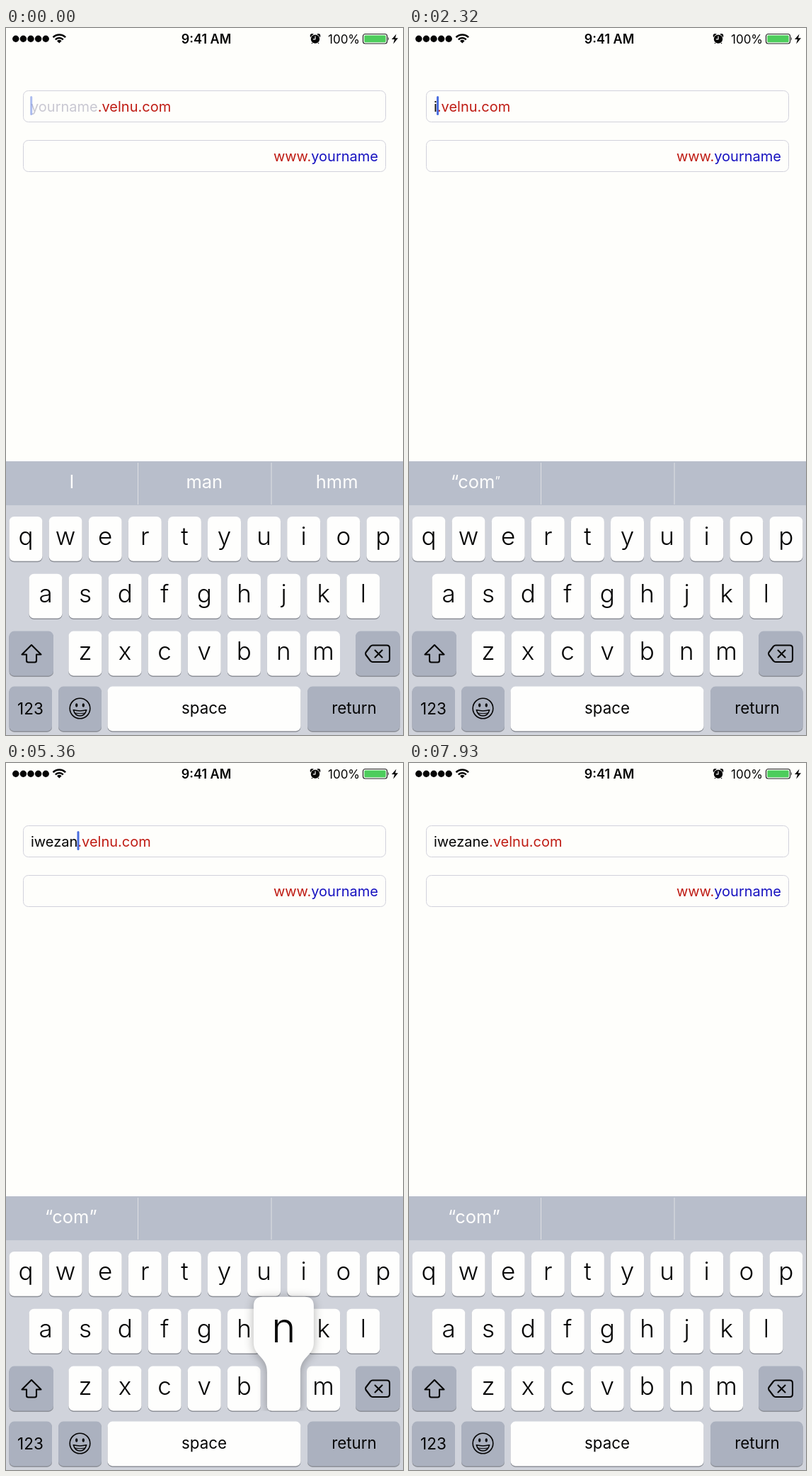
Animation of 561 by 997 pixels, one loop 8 s. Source, as an HTML page with a canvas:

```html
<!DOCTYPE html>
<html lang="en">
<head>
<meta charset="utf-8">
<title>Text fields with keyboard</title>
<style>
  html, body { margin: 0; width: 100%; height: 100%; overflow: hidden; background: #fefefb; }
  canvas { display: block; width: 561px; height: 997px; }
</style>
</head>
<body>
<canvas id="stage"></canvas>
<script>
const W = 561, H = 997, LOOP = 8000;
const canvas = document.getElementById('stage');
const ctx = canvas.getContext('2d');
const scale = window.devicePixelRatio || 1;
canvas.width = W * scale;
canvas.height = H * scale;

const INK = '#050505', RED = '#bf1c14', BLUE = '#1712c0', PALE = '#c9c8d2';
const BACK = '#fefefb', WHITE = '#fefefd';
const KEY_W = 47, KEY_H = 62.8, PITCH = 56.1;
const ROWS = [689, 769.8, 850.6, 928.6];
const DOMAIN = '.velnu.com';

const keys = {};
[['qwertyuiop', 4.5], ['asdfghjkl', 32.5], ['zxcvbnm', 88.4]].forEach(([letters, x], row) =>
  [...letters].forEach((letter, i) => keys[letter] = { x: x + i * PITCH, y: ROWS[row] }));

// letter, key down, key up (the letter is inserted on key up)
const presses = [
  ['i', 1460, 1860], ['w', 4240, 4320], ['e', 4480, 4560], ['z', 4740, 4820],
  ['a', 4990, 5070], ['n', 5230, 5310], ['e', 6030, 6120]
];
const POPUP_LINGER = 90;

const clamp = v => Math.max(0, Math.min(1, v));
const ramp = (t, from, to) => clamp((t - from) / (to - from));

function text(str, x, y, size, color, align = 'left', weight = 400) {
  ctx.font = `${weight} ${size}px Inter, sans-serif`;
  ctx.textAlign = align;
  ctx.fillStyle = color;
  ctx.fillText(str, x, y);
  return ctx.measureText(str).width;
}

function box(x, y, w, h, r, color) {
  ctx.beginPath();
  ctx.roundRect(x, y, w, h, r);
  ctx.fillStyle = color;
  ctx.fill();
}

function disc(x, y, r, color = INK) {
  ctx.beginPath();
  ctx.arc(x, y, r, 0, 7);
  ctx.fillStyle = color;
  ctx.fill();
}

function stroke(path, width, color = INK) {
  ctx.lineWidth = width;
  ctx.strokeStyle = color;
  ctx.stroke(new Path2D(path));
}

function fill(path, color = INK) {
  ctx.fillStyle = color;
  ctx.fill(new Path2D(path));
}

function statusBar() {
  for (let i = 0; i < 5; i++) disc(13.8 + i * 10.6, 15.3, 4.7);
  ctx.lineCap = 'butt';
  stroke('M66.5 13.2A12.2 12.2 0 0 1 84.1 13.2M69.8 16.3A7.8 7.8 0 0 1 80.8 16.3', 2.5);
  fill('M75.3 21.5L72 18.2A4.7 4.7 0 0 1 78.6 18.2Z');
  text('9:41 AM', 283, 21.6, 18, INK, 'center', 600);

  // Alarm clock: bells, feet, a gap ring, then the dial with its hands.
  disc(432.6, 11, 2.9);
  disc(441.4, 11, 2.9);
  stroke('M433.6 19.5L432.2 22M440.4 19.5L441.8 22', 1.5);
  disc(437, 15.6, 7, BACK);
  disc(437, 15.6, 6.2);
  stroke('M437 11.6V15.8H433.8', 1.2, WHITE);

  text('100%', 455, 21.6, 17, INK);
  ctx.beginPath();
  ctx.roundRect(504.5, 8.5, 34, 13.5, 3);
  ctx.lineWidth = 1.2;
  ctx.strokeStyle = '#222';
  ctx.stroke();
  box(506.3, 10.2, 30.4, 10, 1.5, '#4dcd5c');
  fill('M539.8 12.5Q542 15.2 539.8 18Z', '#222');
  fill('M551.5 8.5L545 16H549L547.2 22.5L554 14.2H550Z');
}

function fieldBorder(y) {
  ctx.beginPath();
  ctx.roundRect(24.5, y + .5, 512, 44, 7);
  ctx.lineWidth = 1;
  ctx.strokeStyle = '#d2d2dc';
  ctx.stroke();
}

function caretOpacity(t, lastInsert) {
  const phase = (t - lastInsert) % 1000;
  return 1 - ramp(phase, 600, 750) + ramp(phase, 920, 1000);
}

function fields(t) {
  fieldBorder(88);
  fieldBorder(158);
  const done = presses.filter(p => t >= p[2]);
  const typed = done.map(p => p[0]).join('');
  const start = 35, baseline = 117.7, size = 20;
  const width = text(typed || 'yourname', start, baseline, size, typed ? INK : PALE);
  text(DOMAIN, start + width, baseline, size, RED);

  const lastInsert = done.length ? done[done.length - 1][2] : -955;
  ctx.globalAlpha = caretOpacity(t, lastInsert);
  box(start - .8 + (typed ? width : 0), 96, 3, 27, 1.5, '#4a6ddf');
  ctx.globalAlpha = 1;

  const nameWidth = text('yourname', 526, 187.8, size, BLUE, 'right');
  text('www.', 526 - nameWidth, 187.8, size, RED, 'right');
}

function suggestions(t) {
  box(0, 611, W, 62, 0, '#b8becb');
  box(186, 613, 1, 59, 0, '#dedfe4');
  box(374.5, 613, 1, 59, 0, '#dedfe4');
  const y = 649, size = 25.5;
  const grow = ramp(t, 2240, 2400);
  if (!grow) {
    ['I', 'man', 'hmm'].forEach((word, i) => text(word, 93 + i * 187.3, y, size, WHITE, 'center'));
    return;
  }
  const left = 55 + 8 * (1 - grow);
  const end = left + text('“com', left, y, size, WHITE);
  const quoteSize = size * (.3 + .7 * grow);
  text('”', end, y - .5 * (size - quoteSize), quoteSize, WHITE);
}

function key(x, y, w, color = WHITE) {
  box(x, y + 1.5, w, KEY_H, 7, '#8d9098');
  box(x, y, w, KEY_H, 7, color);
}

function keyboard() {
  const DARK = '#abb1bf';
  const [, , third, fourth] = ROWS;
  box(0, 673, W, H - 673, 0, '#d0d3db');
  for (const [letter, { x, y }] of Object.entries(keys)) {
    key(x, y, KEY_W);
    text(letter, x + KEY_W / 2, y + 40, 35, INK, 'center', 350);
  }
  key(4.5, third, 62.5, DARK);
  key(494, third, 62.5, DARK);
  key(4.5, fourth, 60.5, DARK);
  key(74, fourth, 61, DARK);
  key(143.5, fourth, 273, WHITE);
  key(426, fourth, 130.5, DARK);
  text('123', 34.5, 968, 22.5, INK, 'center');
  text('space', 280, 967, 22.3, INK, 'center');
  text('return', 492, 967, 22.3, INK, 'center');

  ctx.lineJoin = 'round';
  ctx.lineCap = 'round';
  stroke('M36 870L22.5 883.5H29V892Q29 894.5 31.5 894.5H40.5Q43 894.5 43 892V883.5H49.5Z', 2.1);
  stroke('M518 870.5H538Q542 870.5 542 874.5V890Q542 894 538 894H518Q516.5 894 515 892.5L508.5 884Q507.5 882.3 508.5 880.5L515 872Q516.5 870.5 518 870.5Z', 2.1);
  stroke('M521.5 877.5L531.5 887.5M531.5 877.5L521.5 887.5', 2.1);

  stroke('M90.2 959.5A14.3 14.3 0 1 0 118.8 959.5A14.3 14.3 0 1 0 90.2 959.5', 1.6);
  fill('M98 955a1.7 2.8 0 1 0 3.4 0a1.7 2.8 0 1 0 -3.4 0M107.6 955a1.7 2.8 0 1 0 3.4 0a1.7 2.8 0 1 0 -3.4 0');
  stroke('M95.3 961.8Q104.5 964 113.7 961.8Q111.5 970 104.5 970Q97.5 970 95.3 961.8Z', 1.5);
  stroke('M97.5 966Q104.5 967.5 111.5 966', 1.2);
}

function popup(letter) {
  const { x, y } = keys[letter];
  const bubble = new Path2D(`M${x - 6} ${y - 97.8}h59q13 0 13 13v52c0 18 -19 20 -19 40v49q0 7 -7 7
    h-33q-7 0 -7 -7v-49c0 -20 -19 -22 -19 -40v-52q0 -13 13 -13z`);
  // The key underneath is covered along with its letter and keeps its own shadow.
  key(x, y, KEY_W);
  ctx.save();
  ctx.beginPath();
  ctx.rect(0, 0, W, y + KEY_H);
  ctx.clip();
  ctx.shadowColor = 'rgba(0,0,0,.3)';
  ctx.shadowBlur = 14 * scale;
  ctx.shadowOffsetY = 2 * scale;
  ctx.fillStyle = WHITE;
  ctx.fill(bubble);
  ctx.restore();
  text(letter, x + KEY_W / 2, y - 34, 58, INK, 'center', 300);
}

function draw(t) {
  ctx.setTransform(scale, 0, 0, scale, 0, 0);
  box(0, 0, W, H, 0, BACK);
  statusBar();
  fields(t);
  suggestions(t);
  keyboard();
  presses.filter(([, down, up]) => t >= down && t < up + POPUP_LINGER)
    .forEach(([letter]) => popup(letter));
}

const begin = performance.now();
function tick() {
  draw((performance.now() - begin) % LOOP);
  requestAnimationFrame(tick);
}
tick();
</script>
</body>
</html>
```
